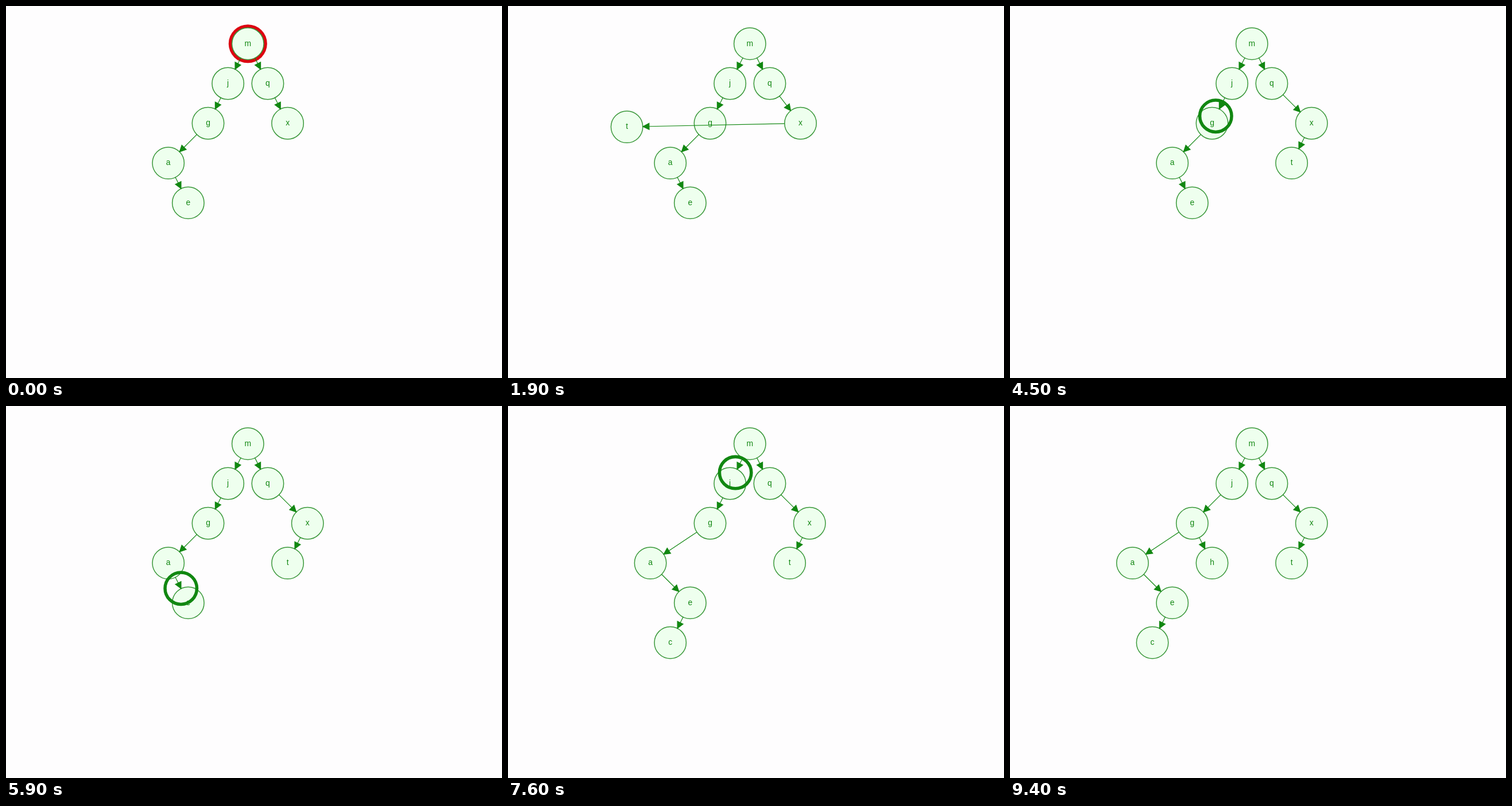
Recreate the animation shown at these times as an HTML page with a canvas. Size 864 by 648 pixels, loop 9500 ms.

```html
<!DOCTYPE html>
<html lang="en">
<head>
<meta charset="utf-8">
<title>Binary search tree insertion</title>
<style>
  html, body { margin: 0; height: 100%; overflow: hidden; background: #fefdfe; }
  canvas { display: block; }
</style>
</head>
<body>
<canvas id="stage" width="864" height="648"></canvas>
<script>
const ctx = document.getElementById('stage').getContext('2d');
const LOOP = 9500, HOLD = 100;            // ms
const TICK = 30.6, BLOCK = 12;            // ms per tick, ticks per step
const SCALE = 1.386, RADIUS = 20 * SCALE;
const GREEN = '#118711', OUTLINE = '#3a983a', FILL = '#eeffee', RED = '#dd0511';
const PULSE_LOW = 3685, PULSE_PERIOD = 56 * TICK;

const parent = { j: 'm', q: 'm', g: 'j', x: 'q', a: 'g', e: 'a', t: 'x', c: 'e', h: 'g' };
const startColumns = { m: 0, j: -1, q: 1, g: -2, x: 2, a: -4, e: -3 };

// Each insertion compares along its path, then the tree moves to new columns.
const inserts = [
  { shown: 0, start: -132, path: 'mqxt', moves: { x: 3, t: 2 } },
  { shown: 3098, start: 3098, path: 'mjgaec', moves: { a: -5, c: -4 } },
  { shown: 7001, start: 6970, path: 'mjgh', moves: { g: -3, a: -6, e: -4, c: -5, h: -2 } }
];

const depth = key => parent[key] ? depth(parent[key]) + 1 : 0;
const place = (column, row) => ({ x: 421.3 + column * 25 * SCALE, y: 65.7 + row * 50 * SCALE });
const mix = (a, b, p) => ({ x: a.x + (b.x - a.x) * p, y: a.y + (b.y - a.y) * p });
const entry = place(-16, 1);

function disc(p, radius) {
  ctx.beginPath();
  ctx.arc(p.x, p.y, radius, 0, 2 * Math.PI);
}

function drawNode(key, p) {
  disc(p, RADIUS);
  ctx.fillStyle = FILL;
  ctx.fill();
  ctx.strokeStyle = OUTLINE;
  ctx.lineWidth = 1.5;
  ctx.stroke();
  ctx.fillStyle = GREEN;
  ctx.fillText(key, p.x, p.y);
}

function drawHighlight(p, time) {
  const phase = ((time - PULSE_LOW) / PULSE_PERIOD % 1 + 1) % 1;
  const grow = 3 + 4 * (1 - Math.abs(2 * phase - 1));
  disc(p, RADIUS + grow * SCALE);
  ctx.fillStyle = RED;
  ctx.fill();
}

function drawEdge(from, to) {
  const angle = Math.atan2(to.y - from.y, to.x - from.x);
  const tip = Math.hypot(to.x - from.x, to.y - from.y) - RADIUS;
  const back = tip - 8 * SCALE, half = 4 * SCALE;
  ctx.save();
  ctx.translate(from.x, from.y);
  ctx.rotate(angle);
  ctx.strokeStyle = ctx.fillStyle = GREEN;
  ctx.lineWidth = 1.2;
  ctx.beginPath();
  ctx.moveTo(RADIUS, 0);
  ctx.lineTo(tip, 0);
  ctx.stroke();
  ctx.beginPath();
  ctx.moveTo(tip, 0);
  ctx.lineTo(back, half);
  ctx.lineTo(back, -half);
  ctx.closePath();
  ctx.fill();
  ctx.stroke();
  ctx.restore();
}

function sceneAt(time) {
  const columns = { ...startColumns }, nodes = {};
  let marked = null, ring = null;
  const locate = key => place(columns[key], depth(key));
  const settle = () => { for (const key in columns) nodes[key] = locate(key); };
  settle();

  for (const { shown, start, path, moves } of inserts) {
    if (time < shown) break;
    const tick = Math.floor((time - start) / TICK);
    const step = Math.floor(tick / BLOCK), part = (tick % BLOCK) / (BLOCK - 1);
    const lastStep = 2 * path.length - 3;
    if (step < lastStep) {
      const at = path[step >> 1];
      if (step % 2) ring = mix(nodes[at], nodes[path[(step >> 1) + 1]], part);
      else marked = at;
      break;
    }
    const before = { ...nodes };
    Object.assign(columns, moves);
    settle();
    if (step === lastStep) {
      for (const key in moves) nodes[key] = mix(before[key] || entry, nodes[key], part);
    }
  }
  return { nodes, marked, ring };
}

function draw(time) {
  const { nodes, marked, ring } = sceneAt(time);
  ctx.fillStyle = '#fefdfe';
  ctx.fillRect(0, 0, 864, 648);
  ctx.font = 10 * SCALE + 'px "Liberation Sans", Arial, sans-serif';
  ctx.textAlign = 'center';
  ctx.textBaseline = 'middle';

  for (const key in nodes) if (key !== marked) drawNode(key, nodes[key]);
  if (marked) {
    drawHighlight(nodes[marked], time);
    drawNode(marked, nodes[marked]);
  }
  if (ring) {
    disc(ring, RADIUS);
    ctx.strokeStyle = GREEN;
    ctx.lineWidth = 4 * SCALE;
    ctx.stroke();
  }
  for (const key in nodes) if (parent[key]) drawEdge(nodes[parent[key]], nodes[key]);
}

function frame() {
  draw(Math.floor(performance.now() % LOOP / HOLD) * HOLD);
  requestAnimationFrame(frame);
}
frame();
</script>
</body>
</html>
```
